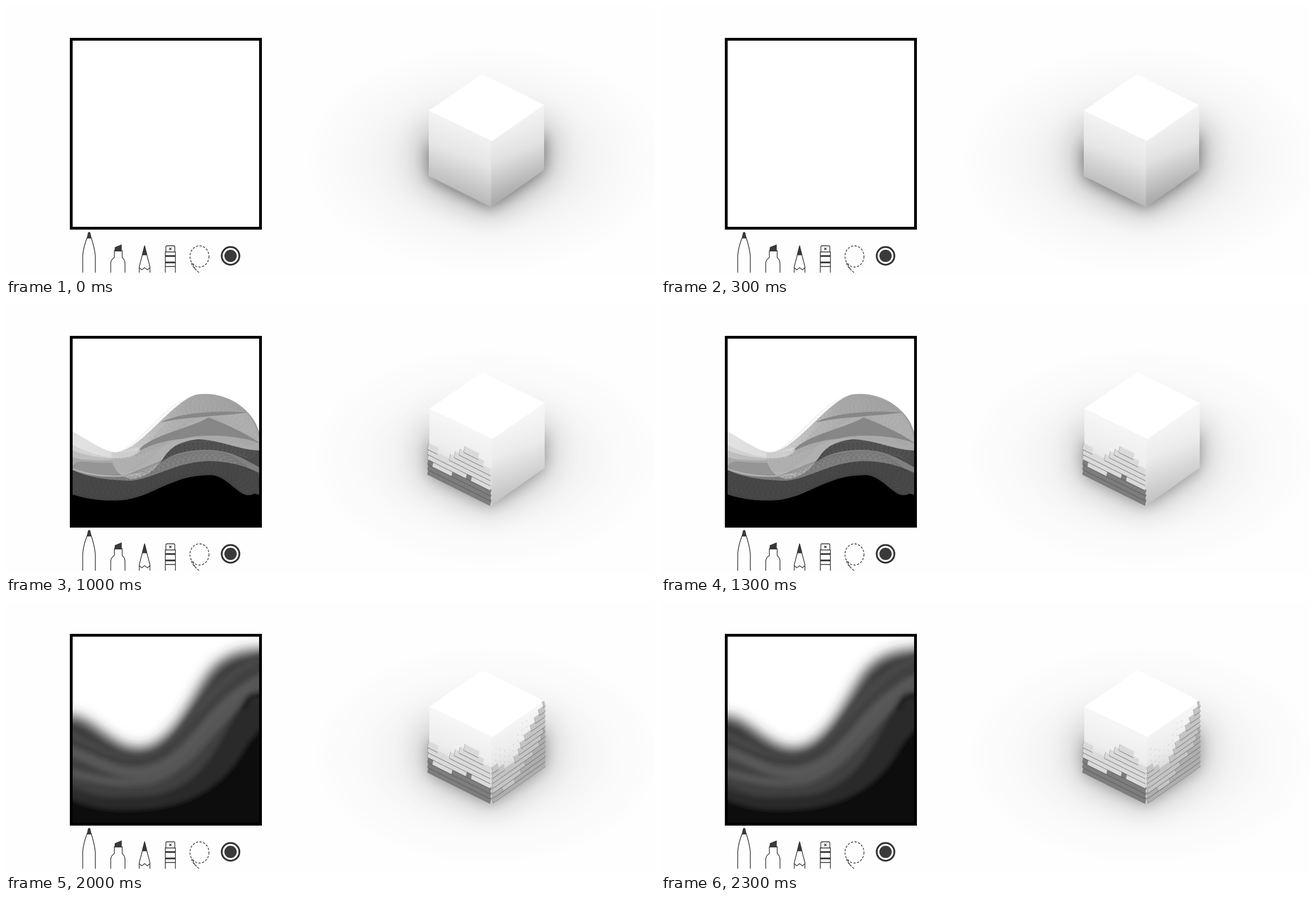
These frames come from a looping animation (1159 px wide and 483 px high, 2.5 s). An HTML page:

```html
<!DOCTYPE html>
<html lang="en">
<head>
<meta charset="utf-8">
<title>Sketch to cube</title>
<style>
html, body { margin: 0; width: 100%; height: 100%; overflow: hidden; background: #fefefe; }
svg { display: block; }
.ink { fill: none; stroke: #333; stroke-width: 1.3; }
.solid { fill: #3a3a3a; }
</style>
</head>
<body>
<svg width="1159" height="483" viewBox="0 0 1159 483">
  <defs>
    <clipPath id="page"><rect x="119" y="62" width="333" height="333"/></clipPath>
    <filter id="b4" x="-50%" y="-50%" width="200%" height="200%"><feGaussianBlur stdDeviation="4"/></filter>
    <filter id="b12" x="-50%" y="-50%" width="200%" height="200%"><feGaussianBlur stdDeviation="12"/></filter>
    <filter id="b28" x="-80%" y="-80%" width="260%" height="260%"><feGaussianBlur stdDeviation="28"/></filter>
    <radialGradient id="halo">
      <stop offset="0" stop-opacity=".15"/><stop offset=".35" stop-opacity=".085"/>
      <stop offset=".65" stop-opacity=".03"/><stop offset="1" stop-opacity="0"/>
    </radialGradient>
    <linearGradient id="light"><stop stop-color="#e2e2e2"/><stop offset=".3" stop-color="#cfcfcf"/><stop offset=".6" stop-color="#a9a9a9"/><stop offset="1" stop-color="#a0a0a0"/></linearGradient>
    <linearGradient id="left" gradientUnits="userSpaceOnUse" x1="828" y1="212" x2="784" y2="327">
      <stop stop-color="#f4f4f4"/><stop offset=".45" stop-color="#e6e6e6"/><stop offset="1" stop-color="#b8b8b8"/>
    </linearGradient>
    <linearGradient id="right" gradientUnits="userSpaceOnUse" x1="890" y1="210" x2="936" y2="324">
      <stop stop-color="#f3f3f3"/><stop offset=".45" stop-color="#e2e2e2"/><stop offset="1" stop-color="#acacac"/>
    </linearGradient>
  </defs>

  <g id="shadow">
    <ellipse cx="858" cy="274" rx="325" ry="205" fill="url(#halo)"/>
    <path d="M752 220L866 235 966 210 968 296 866 368 748 308Z" filter="url(#b28)" opacity=".3"/>
    <path d="M755 250L866 260 961 230V294L866 361 755 306Z" filter="url(#b12)" opacity=".36"/>
  </g>
  <g id="cube">
    <path d="M755 187L867 242V360L755 304Z" fill="url(#left)"/>
    <path d="M866 242L961 177V293L866 360Z" fill="url(#right)"/>
    <path id="glow" d="M755 187L866 242 961 177V293L866 360 755 304Z" fill="#fff"/>
    <path d="M850 122L961 177 867 242 755 187Z" fill="#fff"/>
  </g>
  <g id="leftSlabs"></g>
  <g id="rightSlabs"></g>

  <rect x="116.500" y="59.500" width="338" height="338" fill="#fff" stroke="#000" stroke-width="5"/>
  <g id="marker" clip-path="url(#page)">
    <path d="M119 228C150 245 175 265 197 265C240 262 295 175 340 162C390 154 440 185 452 229V395H119Z" fill="url(#light)"/>
    <path d="M119 252C150 268 195 282 225 272C255 258 270 220 300 203C340 195 395 194 430 195C442 208 450 225 452 245V395H119Z" fill="#b3b3b3" opacity=".75"/>
    <path d="M276 212C310 193 385 190 430 194C390 201 330 200 276 212Z" fill="#888"/>
    <path d="M230 270C250 235 320 226 362 203C395 216 430 232 452 248V300H230Z" fill="#878787"/>
    <path d="M119 274C145 282 190 280 215 278C255 270 295 238 350 236C390 234 430 240 452 249V300H119Z" fill="#a9a9a9"/>
    <path d="M119 290C128 275 140 285 190 284C196 300 206 310 230 313V330H119Z" fill="#959595"/>
    <path d="M268 300C285 262 305 242 345 242C385 244 420 262 452 262V395H268Z" fill="#4c4c4c"/>
    <path d="M119 297C150 314 190 317 232 315C280 305 300 280 365 280C400 280 430 295 452 312V395H119Z" fill="#4a4a4a"/>
    <path d="M119 339C140 349 170 352 205 351C270 344 290 306 365 306C400 306 418 336 452 341V395H119Z"/>
    <path d="M100 308C140 332 200 333 225 325C290 300 310 284 365 284C395 284 415 308 433 320" fill="none" stroke="#484848" stroke-width="44" stroke-linecap="round"/>
    <path d="M119 293C155 313 195 304 250 302C290 268 320 260 365 261C405 263 430 280 452 292V302C420 286 390 281 360 281C300 284 270 310 225 316C185 316 145 310 119 297Z" fill="#808080"/>
    <path d="M188 266C188 292 203 312 226 313C258 308 272 290 286 268C300 248 335 242 350 241C310 237 265 248 240 262Z" fill="#b2b2b2" opacity=".85"/>
    <path d="M119 295C150 308 190 312 240 304" fill="none" stroke="#bbb" stroke-width="3"/>
    <path d="M119 228C150 245 175 265 197 265C230 263 235 250 240 262C225 283 160 278 119 262Z" fill="#e4e4e4" opacity=".55"/>
    <g id="scallops" fill="none"></g>
  </g>
  <g id="brush" clip-path="url(#page)" fill="none">
    <path d="M60 205H119C155 208 190 263 238 263C300 260 335 165 365 125C392 92 425 84 500 84V440H60Z" fill="#333" filter="url(#b12)"/>
    <g filter="url(#b4)">
      <path d="M95 250C160 275 180 308 245 303C350 290 350 145 480 118" stroke="#474747" stroke-width="58"/>
      <path d="M95 290C150 310 180 332 240 328C365 315 375 175 480 140" stroke="#414141" stroke-width="54"/>
      <path d="M95 264C160 275 180 310 245 305C345 288 355 175 480 127" stroke="#595959" stroke-width="17"/>
      <path d="M95 300C150 315 200 330 260 318C345 290 370 200 480 132" stroke="#555" stroke-width="14"/>
      <path d="M95 242C150 262 185 291 245 286C330 270 350 150 480 104" stroke="#353535" stroke-width="5"/>
      <path d="M95 332C160 352 205 350 265 345C370 325 390 215 425 178C435 164 450 164 480 164V410H95Z" fill="#2c2c2c"/>
      <path d="M95 342C150 375 210 374 260 369C345 360 395 315 420 272C433 250 450 225 480 210V420H95Z" fill="#101010"/>
      <path d="M425 192C430 164 440 164 475 166" stroke="#131313" stroke-width="8"/>
    </g>
    <g id="grain"></g>
  </g>

  <g class="ink">
    <path d="M137 477V447Q138 432 145 414M159.500 477V447Q158 432 152 414"/>
    <path class="solid" d="M145 415L147 406Q148.500 404 150 406L152 415Z"/>
    <path d="M187 477V461Q187 454 193.500 450V438H207.500V450Q212.500 454 212.500 461V477"/>
    <path class="solid" d="M194.500 438L195 432 206 427.500V438Z"/>
    <path d="M238 477V466L247.500 430 257 466V477M238 468L242.500 472 247.500 468 252.500 472 257 468"/>
    <path class="solid" d="M243.500 445L247.500 429 251.500 445Z"/>
    <path d="M284.500 477V440H302.500V477M285.500 440V431Q285.500 429 287.500 429H299.500Q301.500 429 301.500 431V440M284.500 446.500H302.500M284.500 448H302.500M284.500 458H302.500M284.500 459.500H302.500M284.500 466H302.500M291.500 432.500L295.500 436.500M295.500 432.500L291.500 436.500"/>
    <ellipse cx="345.500" cy="448" rx="17" ry="19" stroke-dasharray="4 2.500"/>
    <path d="M331 460Q335 470 345 477M335 461Q333 466 340 472" stroke-dasharray="4 2"/>
    <circle cx="401" cy="447" r="15.800" stroke-width="3.200"/>
    <circle class="solid" cx="401" cy="447" r="11" stroke="none"/>
  </g>
</svg>
<script>
const $ = id => document.getElementById(id);
const H = 117, ROWS = 13, COLS = 26;

function add(parent, tag, attrs) {
  const el = document.createElementNS('http://www.w3.org/2000/svg', tag);
  for (const k in attrs) el.setAttribute(k, attrs[k]);
  return parent.appendChild(el);
}

// Smooth height profile through [u, h] points.
function profile(pts) {
  return u => {
    let i = 1;
    while (i < pts.length - 1 && u > pts[i][0]) i++;
    const [a, ha] = pts[i - 1], [b, hb] = pts[i];
    return ha + (hb - ha) * (1 - Math.cos(Math.PI * (u - a) / (b - a))) / 2;
  };
}

// Louvred slabs on a face: base corner, base edge, outward push, tone per cell.
function slabs(group, [x, y], [ex, ey], [ox, oy], tone) {
  const at = (u, h, d) => [x + ex * u + ox * d, y + ey * u - h * H + oy * d];
  const poly = (pts, fill, opacity = 1) => add(group, 'polygon', { points: pts.join(' '), fill, opacity });
  for (let k = 0; k < ROWS; k++) {
    const lo = k / ROWS, hi = (k + 1) / ROWS;
    for (let c = 0, start = 0; c < COLS; c++) {
      const fill = tone((c + .5) / COLS, (k + .5) / ROWS);
      if (c < COLS - 1 && tone((c + 1.5) / COLS, (k + .5) / ROWS) === fill) continue;
      const a = start / COLS, b = (c + 1) / COLS;
      start = c + 1;
      if (!fill) continue;
      const p = at(a, lo, 1), q = at(b, lo, 1);
      if (k) poly([p, q, at(b, lo - .024, .4), at(a, lo - .024, .4)], '#444', .45);
      poly([at(a, hi, 0), at(b, hi, 0), q, p], fill);
      add(group, 'path', { d: `M${p}L${q}`, stroke: '#555', 'stroke-width': .9, opacity: .5 });
      add(group, 'path', { d: `M${at(a, hi, 0)}L${p}`, stroke: '#666', 'stroke-width': .8, opacity: .5 });
    }
  }
}

const hill = profile([[0, .5], [.24, .39], [.7, .71], [1, .53]]);
const ground = profile([[0, .2], [.25, .16], [.65, .27], [1, .2]]);
const slope = profile([[0, .55], [.35, .37], [.7, .72], [1, .97]]);
const floor = profile([[0, .14], [.35, .09], [.8, .35], [1, .62]]);

slabs($('leftSlabs'), [755, 303], [112, 56], [-2.500, 1.800], (u, h) =>
  h < ground(u) ? '#7d7d7d' : h < hill(u) ? '#dadada' : '');
slabs($('rightSlabs'), [867, 359], [94, -66], [2.700, 1.300], (u, h) =>
  h < floor(u) ? '#aeaeae' : h < slope(u) ? '#c4c4c4' : '');

// Small bumps above the slope on the right face.
for (let i = 1; i < 9; i++)
  for (let j = 0; j < 3; j++) {
    const u = i / 12, h = slope(u) + .07 + j * .09;
    if (h < .93) add($('rightSlabs'), 'circle', { cx: 867 + 94 * u, cy: 359 - 66 * u - h * H, r: .7, fill: '#888', opacity: .6 });
  }

// Overlapping round marker tips along a path.
function tips(group, d, r, step, color, opacity) {
  const line = add(group, 'path', { d, stroke: 'none' });
  for (let s = 0; s < line.getTotalLength(); s += step) {
    const p = line.getPointAtLength(s);
    add(group, 'circle', { cx: p.x, cy: p.y, r, stroke: color, opacity });
  }
}
tips($('scallops'), 'M100 308C140 332 200 333 225 325C290 300 310 284 365 284C395 284 415 308 433 320', 21, 9, '#222', .16);
tips($('scallops'), 'M215 280C260 260 300 183 350 183C395 184 420 210 440 236', 20, 8, '#777', .1);
tips($('scallops'), 'M285 268C310 250 400 250 440 268', 10, 8, '#ccc', .12);
tips($('grain'), 'M95 270C160 290 180 315 245 312C350 295 350 165 480 127', 22, 7, '#777', .07);

function draw() {
  const step = Math.floor(performance.now() / 500) % 5;
  const show = (id, on) => $(id).setAttribute('display', on ? 'inline' : 'none');
  show('marker', step === 1 || step === 2);
  show('brush', step > 2);
  show('leftSlabs', step > 1);
  show('rightSlabs', step === 4);
  $('shadow').setAttribute('opacity', step > 1 ? .78 : 1);
  $('glow').setAttribute('opacity', step > 1 ? .3 : 0);
  $('cube').setAttribute('transform', step > 1 ? 'translate(1 0)' : '');
  requestAnimationFrame(draw);
}
draw();
</script>
</body>
</html>
```
